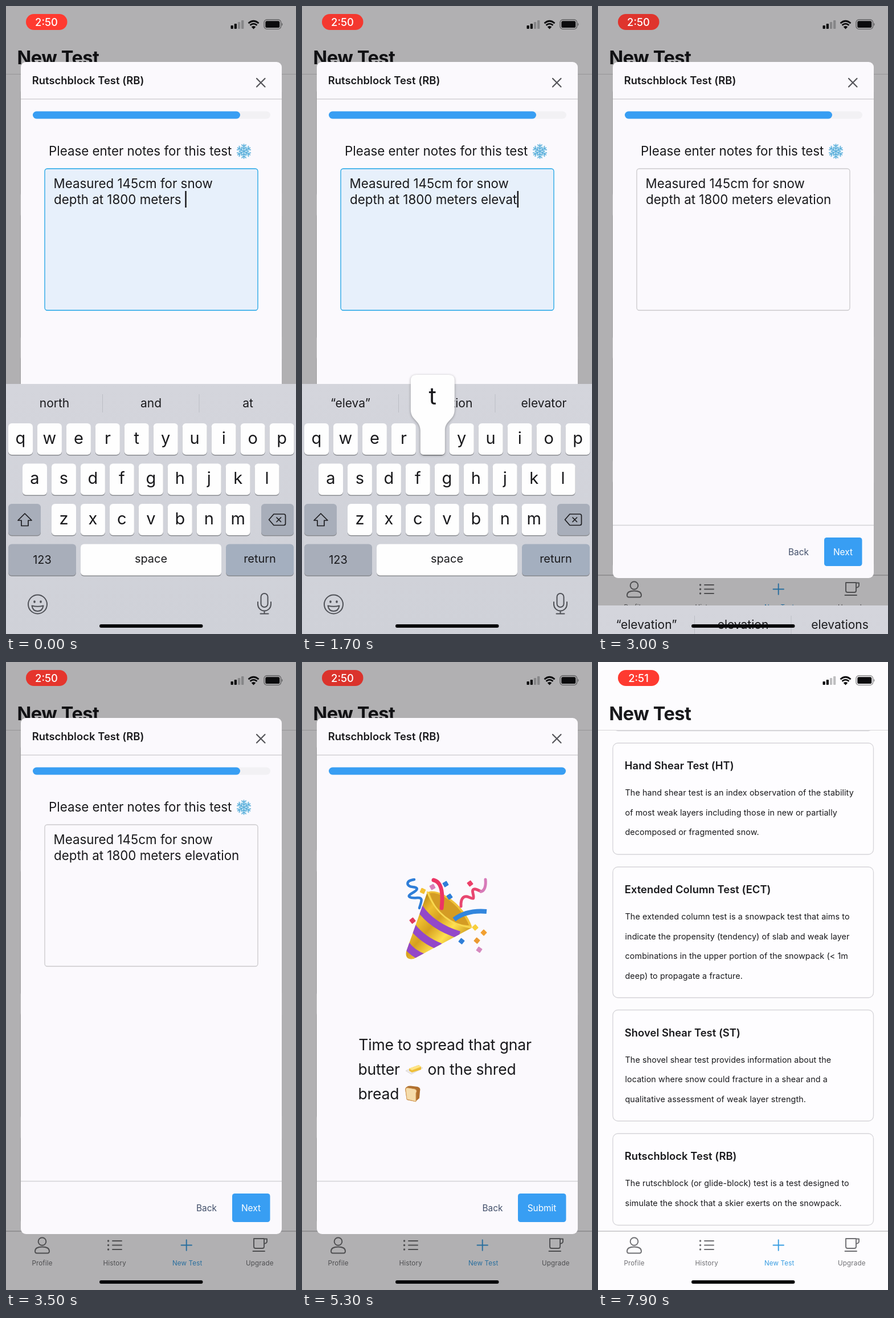
An HTML page that plays this animation: 509 px wide and 1100 px high, repeating every 8 s.

```html
<!DOCTYPE html>
<html lang="en">
<head>
<meta charset="utf-8">
<title>Snow test form</title>
<style>
html, body { margin: 0; width: 100%; height: 100%; overflow: hidden; background: #fdfcfe; }
svg.stage { position: fixed; inset: 0; width: 100vw; height: 100vh; }
text { font-family: Inter, Roboto, sans-serif; font-optical-sizing: none; fill: #19191c; }
.mid { text-anchor: middle; }
.line { fill: none; stroke-linecap: round; stroke-linejoin: round; }
.h1 { font-size: 32.5px; font-weight: 700; letter-spacing: -.45px; }
.h2 { font-size: 18.4px; font-weight: 600; letter-spacing: .04px; }
.body { font-size: 14.35px; letter-spacing: .09px; }
.note { font-size: 22.35px; }
.cheer { font-size: 26.5px; letter-spacing: -.17px; }
.tab { font-size: 11.6px; letter-spacing: .15px; fill: #6f6f73; }
.btn { font-size: 15.4px; fill: #fff; }
.back { fill: #43506b; }
.clock { font-size: 18.4px; font-weight: 500; fill: #fff; }
.hint { font-size: 21px; fill: url(#fade); }
.key { font-size: 29px; }
.word { font-size: 19.9px; }
.big { font-size: 41px; }

.loop { animation: 8s linear infinite; }
.step { animation-timing-function: step-end; }
#pill { animation: pulse 2s -1.8s ease-in-out infinite; }
#kb { animation-name: kbDown; }
#field { animation-name: blur; }
#caret { animation-name: caretOff; }
#notes { animation-name: notesOff; }
#done { animation-name: doneOn; }
#bar { animation-name: fill; }
#t50 { animation-name: t50; }
#t51 { animation-name: t51; }
#modal { animation-name: modalDown; }
#dim { animation-name: undim; }
@keyframes pulse { 0%, 10%, 90%, 100% { fill: #ff3a30 } 50% { fill: #da332c } }
@keyframes kbDown {
  0%, 35% { transform: none; animation-timing-function: cubic-bezier(.3, .6, .2, 1) }
  40.6%, 100% { transform: translateY(445px) }
}
@keyframes blur {
  0%, 35% { fill: #e7f0fb; stroke: #1ea4e6 }
  37.5%, 100% { fill: #fbf9fd; stroke: #cbcacd }
}
@keyframes caretOff { 0% { opacity: 1 } 35%, 100% { opacity: 0 } }
@keyframes notesOff { 0% { opacity: 1 } 51.25%, 100% { opacity: 0 } }
@keyframes doneOn { 0% { opacity: 0 } 51.25%, 100% { opacity: 1 } }
@keyframes fill {
  0%, 51.25% { width: 364px; animation-timing-function: ease }
  55%, 100% { width: 416px }
}
@keyframes t50 { 0% { opacity: 1 } 73.75%, 100% { opacity: 0 } }
@keyframes t51 { 0% { opacity: 0 } 73.75%, 100% { opacity: 1 } }
@keyframes modalDown {
  0%, 84.375% { transform: none; animation-timing-function: cubic-bezier(.32, .72, 0, 1) }
  90%, 100% { transform: translateY(1010px) }
}
@keyframes undim { 0%, 84.375% { opacity: .3 } 90%, 100% { opacity: 0 } }
</style>
</head>
<body>
<svg class="stage" viewBox="0 0 509 1100">
  <defs>
    <linearGradient id="fade">
      <stop stop-color="#19191c"/><stop offset="1" stop-color="#19191c"/>
    </linearGradient>
    <linearGradient id="gold" x1=".08" y1=".35" x2=".7" y2=".9">
      <stop stop-color="#c08d17"/><stop offset=".2" stop-color="#eebf30"/>
      <stop offset=".42" stop-color="#d6a01f"/><stop offset=".7" stop-color="#ffe04f"/>
      <stop offset="1" stop-color="#c9951c"/>
    </linearGradient>
    <linearGradient id="board" x2="0" y2="1">
      <stop stop-color="#d4d5dc"/><stop offset="1" stop-color="#cfd1d8"/>
    </linearGradient>
    <clipPath id="cone"><path d="M220 403L183 507Q180 523 196 520L297 466Q242 460 220 403Z"/></clipPath>
    <path id="arm" class="line" stroke="#62b2dc" stroke-width="1.7" d="M0 0V-12.5M-3.6-11.5L0-8L3.6-11.5M-3.2-7L0-3.8L3.2-7"/>
  </defs>

  <!-- page -->
  <rect width="509" height="1100" fill="#fdfcfe"/>
  <g id="cards"></g>
  <rect width="509" height="119" fill="#fdfcfe"/>
  <path d="M0 119.5H509" stroke="#d6d5d8"/>
  <text class="h1" x="19.5" y="102">New Test</text>
  <rect y="997" width="509" height="103" fill="#fdfcfe"/>
  <path d="M0 997H509" stroke="#c3c2c5" stroke-width="1.4"/>
  <g class="line" stroke="#6f6f73" stroke-width="1.9">
    <circle cx="63.5" cy="1015" r="6.8"/>
    <path d="M51 1032C51 1026 56 1024.5 63.5 1024.5S76 1026 76 1032Q76 1035.5 73 1035.5H54Q51 1035.5 51 1032Z"/>
    <path d="M187 1014H203M187 1021.5H203M187 1029H203"/>
    <path d="M179.5 1014h.1M179.5 1021.5h.1M179.5 1029h.1" stroke-width="3.4"/>
    <path d="M435 1010H453V1024Q453 1027 450 1027H438Q435 1027 435 1024ZM453 1010.5H458V1015Q458 1018 453 1019M433.5 1032H454"/>
    <path d="M307.5 1021.5H326M316.7 1012.3V1030.8" stroke="#389de2"/>
  </g>
  <g class="mid">
    <text class="tab" x="63.5" y="1057">Profile</text>
    <text class="tab" x="190.7" y="1057">History</text>
    <text class="tab" x="318.2" y="1057" style="fill:#389de2">New Test</text>
    <text class="tab" x="445.3" y="1057">Upgrade</text>
  </g>
  <rect id="dim" class="loop" width="509" height="1100" opacity="0"/>

  <!-- modal -->
  <g id="modal" class="loop">
    <rect x="26" y="98" width="458" height="904" rx="9" fill="#fbf9fd"/>
    <text class="h2" x="45.7" y="137">Rutschblock Test (RB)</text>
    <path class="line" d="M440 127L454.5 141.5M454.5 127L440 141.5" stroke="#55555a" stroke-width="2.2"/>
    <path d="M26 163H484M26 909.5H484" stroke="#d3d2d5" stroke-width="1.3"/>
    <rect x="47" y="184.5" width="417" height="13" rx="6.5" fill="#f2f1f4"/>
    <rect id="bar" class="loop" x="47" y="184.5" width="364" height="13" rx="6.5" fill="#389ef3"/>

    <g id="notes" class="loop step">
      <text class="note" x="75" y="262">Please enter notes for this test</text>
      <g id="flake" transform="translate(417.5 254.5)"><circle r="11" fill="#e2f2fa"/></g>
      <rect id="field" class="loop" x="68" y="285" width="374" height="248" rx="4.5" stroke-width="1.3"/>
      <text class="note" x="83.5" y="319">Measured 145cm for snow</text>
      <text class="note" id="typed" x="84" y="347" xml:space="preserve"></text>
      <rect id="caret" class="loop step" y="324" width="2.5" height="29" fill="#19191c"/>
      <text class="btn back mid" x="352" y="962">Back</text>
      <rect x="397" y="931" width="66.5" height="50" rx="4.5" fill="#389ef3"/>
      <text class="btn mid" x="430" y="962">Next</text>
    </g>

    <g id="done" class="loop step" opacity="0">
      <path d="M220 403C240 394 284 424 298 463Q296 470 284 466C256 456 226 424 220 403Z" fill="#f0c23a"/>
      <path d="M224 405C242 400 280 428 293 461Q276 462 254 450Q234 434 224 405Z" fill="#d49c24"/>
      <g clip-path="url(#cone)">
        <rect x="178" y="400" width="122" height="124" fill="url(#gold)"/>
        <path d="M206 430Q228 463 276 478M194 464Q212 487 243 499M182 494Q194 511 215 518" fill="none" stroke="#9348c9" stroke-width="13"/>
      </g>
      <path class="line" d="M220 403Q242 458 297 465" stroke="#f8d850" stroke-width="2.5"/>
      <g class="line" stroke-width="7">
        <path d="M231 382Q250 386 245 431" stroke="#ec3565"/>
        <path d="M267 451Q289 434 324 437" stroke="#3286dd" stroke-width="8" stroke-linecap="butt"/>
        <path d="M197 381C181 383 183 393 194 394S204 399 193 405S190 414 202 413S209 420 206 431" stroke="#2f7ed8" stroke-width="4.5"/>
        <path d="M279 428C278 411 286 409 293 412S303 417 300 405S308 399 314 402" stroke="#e8466f" stroke-width="5"/>
        <path d="M314 402C321 401 323 391 322 381" stroke="#d77bb9" stroke-width="5"/>
      </g>
      <g id="bits"></g>
      <text class="cheer" x="99.3" y="680">Time to spread that gnar</text>
      <text class="cheer" x="98.5" y="723">butter</text>
      <text class="cheer" x="220.5" y="723">on the shred</text>
      <text class="cheer" x="98.5" y="766">bread</text>
      <path d="M182 716L203 707L212 711L192 722Z" fill="#eceae9" stroke="#d3cfcd" stroke-width=".8"/>
      <path d="M188 712L205 706L209 709V714L193 719L188 716Z" fill="#efbf38"/>
      <path d="M188 712L205 706L209 709L193 715Z" fill="#ffe587"/>
      <path d="M181 748Q183 742 191 742.5L203 744Q209 746 207 752L206 764L199 770L184 767Z" fill="#b0702f"/>
      <path d="M182 750Q181 745 187 746L198 748Q203 750 200 755V770L184 766Z" fill="#f5dcab" stroke="#d59b55"/>
      <text class="btn back mid" x="334.5" y="962">Back</text>
      <rect x="379" y="931" width="84.5" height="50" rx="4.5" fill="#389ef3"/>
      <text class="btn mid" x="421" y="962">Submit</text>
    </g>
  </g>

  <!-- keyboard -->
  <g id="kb" class="loop">
    <rect y="662" width="509" height="445" fill="url(#board)"/>
    <path d="M169.5 680V712M339 680V712" stroke="#bcbec5"/>
    <g id="hints" class="mid"></g>
    <g id="keys" class="mid"></g>
    <g class="line" stroke="#1d1d20" stroke-width="1.7">
      <path d="M33 889L45 901H39V910.5H27V901H21Z"/>
      <path d="M470 890H487.5Q490.5 890 490.5 893V906.5Q490.5 909.5 487.5 909.5H470L461.5 899.7ZM475 896L482.5 903.5M482.5 896L475 903.5"/>
    </g>
    <g class="line" stroke="#4f5157" stroke-width="2">
      <circle cx="55.5" cy="1048" r="16.5"/>
      <path d="M45.5 1050.5Q55.5 1053 65.5 1050.5Q64 1060 55.5 1060T45.5 1050.5Z"/>
      <path d="M50 1043v1M61 1043v1" stroke-width="3.5"/>
      <rect x="447.5" y="1029" width="12" height="24" rx="6"/>
      <path d="M442 1044V1048A11.5 11.5 0 0 0 465 1048V1044M453.5 1060V1064.5M446.5 1064.5H460.5"/>
    </g>
    <g id="pop" class="mid" style="filter:drop-shadow(0 1px 2px #0005)">
      <path d="M-17-75Q-17-85-7-85H50Q60-85 60-75V-24C60-5 43-6 43 13V49Q43 55 37 55H6Q0 55 0 49V13C0-6-17-5-17-24Z" fill="#fefefe"/>
      <text id="popChar" class="big" x="21.5" y="-33.5"></text>
    </g>
  </g>

  <!-- status bar -->
  <rect id="pill" x="35" y="14" width="72.5" height="28" rx="14" fill="#ff3a30"/>
  <text id="t50" class="clock mid loop step" x="71" y="34.7">2:50</text>
  <text id="t51" class="clock mid loop step" x="71" y="34.7" opacity="0">2:51</text>
  <g fill="#0b0b0d">
    <rect x="394.5" y="34" width="4.3" height="6" rx="1"/>
    <rect x="400.7" y="31" width="4.3" height="9" rx="1"/>
    <g opacity=".25">
      <rect x="406.9" y="28" width="4.3" height="12" rx="1"/>
      <rect x="413" y="25" width="4.3" height="15" rx="1"/>
    </g>
    <path d="M434.5 40.5L430.7 36.5Q434.5 33.5 438.3 36.5Z"/>
    <rect x="455.3" y="26.3" width="25" height="11.7" rx="2.6"/>
    <path d="M484 29.5Q487 32 484 35Z" opacity=".5"/>
  </g>
  <g fill="none" stroke="#0b0b0d">
    <path d="M425.5 30.3Q434.5 22.3 443.5 30.3M428.5 33.8Q434.5 28.5 440.5 33.8" stroke-width="2.8"/>
    <rect x="453" y="24" width="29.6" height="16.3" rx="4.8" stroke-width="1.3" opacity=".5"/>
  </g>
  <rect x="164" y="1083" width="181.5" height="6" rx="3" fill="#09090b"/>
</svg>

<script>
const $ = id => document.getElementById(id);

function add(parent, tag, attrs, text) {
  const node = document.createElementNS('http://www.w3.org/2000/svg', tag);
  for (const k in attrs) node.setAttribute(k, attrs[k]);
  if (text) node.textContent = text;
  return parent.appendChild(node);
}

// Test list
function card(top, height, title, lines) {
  add($('cards'), 'rect', { x: 26, y: top, width: 457.5, height, rx: 9, fill: '#fefdff', stroke: '#d6d5d9', 'stroke-width': 1.3 });
  add($('cards'), 'text', { class: 'h2', x: 46.8, y: top + 46 }, title);
  lines.forEach((s, i) =>
    add($('cards'), 'text', { class: 'body', x: 47.5, y: top + 92 + i * 34.5 }, s));
}
card(-60, 180.5, '', []);
card(142, 195, 'Hand Shear Test (HT)', [
  'The hand shear test is an index observation of the stability',
  'of most weak layers including those in new or partially',
  'decomposed or fragmented snow.']);
card(359, 229, 'Extended Column Test (ECT)', [
  'The extended column test is a snowpack test that aims to',
  'indicate the propensity (tendency) of slab and weak layer',
  'combinations in the upper portion of the snowpack (< 1m',
  'deep) to propagate a fracture.']);
card(609.5, 194.5, 'Shovel Shear Test (ST)', [
  'The shovel shear test provides information about the',
  'location where snow could fracture in a shear and a',
  'qualitative assessment of weak layer strength.']);
card(826, 160.5, 'Rutschblock Test (RB)', [
  'The rutschblock (or glide-block) test is a test designed to',
  'simulate the shock that a skier exerts on the snowpack.']);

// Snowflake and confetti
for (let a = 0; a < 360; a += 60) add($('flake'), 'use', { href: '#arm', transform: `rotate(${a})` });
[[212, 401, '#f5c233'], [229, 394, '#d982bd'], [252, 389, '#2f7ed8'], [259, 411, '#2f7ed8'],
 [295, 388, '#ec3f68'], [194, 453, '#e23a5c'], [304, 465, '#f8cf3c'], [319, 474, '#f2a032'],
 [307, 488, '#eb9a30'], [280, 489, '#2f7ed8'], [311, 504, '#d58abf']].forEach(([x, y, fill], i) =>
  add($('bits'), 'rect', { x: -4.2, y: -4.2, width: 8.4, height: 8.4, rx: 1, fill,
    transform: `translate(${x} ${y}) rotate(${25 + i * 37 % 40})` }));

// Keys
const spots = {};
function key(x, y, width, label, cls, fill = '#fefefe', dy = 35.5) {
  add($('keys'), 'rect', { x, y: y + 1.4, width, height: 55, rx: 6, fill: '#898b90' });
  add($('keys'), 'rect', { x, y, width, height: 55, rx: 6, fill });
  if (label) add($('keys'), 'text', { class: cls, x: x + width / 2, y: y + dy }, label);
}
[['qwertyuiop', 4, 731], ['asdfghjkl', 29, 801.5], ['zxcvbnm', 80, 872]].forEach(([row, x0, y]) =>
  [...row].forEach((c, i) => {
    const x = x0 + i * 50.95;
    spots[c] = [x, y];
    key(x, y, 43, c, 'key');
  }));
const grey = '#a8aeba';
key(4, 872, 57, '', '', grey);
key(448, 872, 57, '', '', grey);
key(4, 942.5, 119, '123', 'word', grey, 34);
key(131, 942.5, 247, 'space', 'word', undefined, 32.5);
key(386, 942.5, 119, 'return', 'word', '#a4afbf', 32.5);

// Typing
const word = 'elevation';
const hits = [300, 500, 700, 1100, 1400, 1650, 1900, 2200, 2500];
const HOLD = 100, LAG = 150, WIPE = 150;
const slots = [85, 254.5, 424.5].map(x => add($('hints'), 'text', { class: 'hint', x, y: 703 }));
const stops = document.querySelectorAll('#fade stop');

function hintsFor(n) {
  const quoted = `“${word.slice(0, n)}”`;
  if (n === 0) return ['north', 'and', 'at'];
  if (n === 1) return [quoted, 'even', 'each'];
  if (n === 2) return [quoted, 'else', 'elk'];
  if (n === 3) return ['elevation', 'elevators', 'elevator'];
  return [quoted, 'elevation', n < 8 ? 'elevator' : 'elevations'];
}

function draw(t) {
  const typed = hits.filter(h => t >= h).length;
  const line = $('typed');
  line.textContent = 'depth at 1800 meters ' + word.slice(0, typed);
  $('caret').setAttribute('x', 84.3 + line.getComputedTextLength());

  const down = hits.findIndex(h => t >= h - HOLD && t < h + HOLD);
  $('pop').style.display = down < 0 ? 'none' : '';
  if (down >= 0) {
    $('pop').setAttribute('transform', `translate(${spots[word[down]]})`);
    $('popChar').textContent = word[down];
  }

  const known = hits.filter(h => t >= h + LAG).length;
  const p = known ? Math.min(1, (t - hits[known - 1] - LAG) / WIPE) : 1;
  hintsFor(known).forEach((s, i) => slots[i].textContent = s);
  stops.forEach((s, i) => s.setAttribute('stop-opacity', Math.max(0, Math.min(1, p * 1.6 - i * 0.3))));
}

let start;
function tick(now) {
  start ??= now;
  draw((now - start) % 8000);
  requestAnimationFrame(tick);
}
draw(0);
requestAnimationFrame(tick);
</script>
</body>
</html>
```
